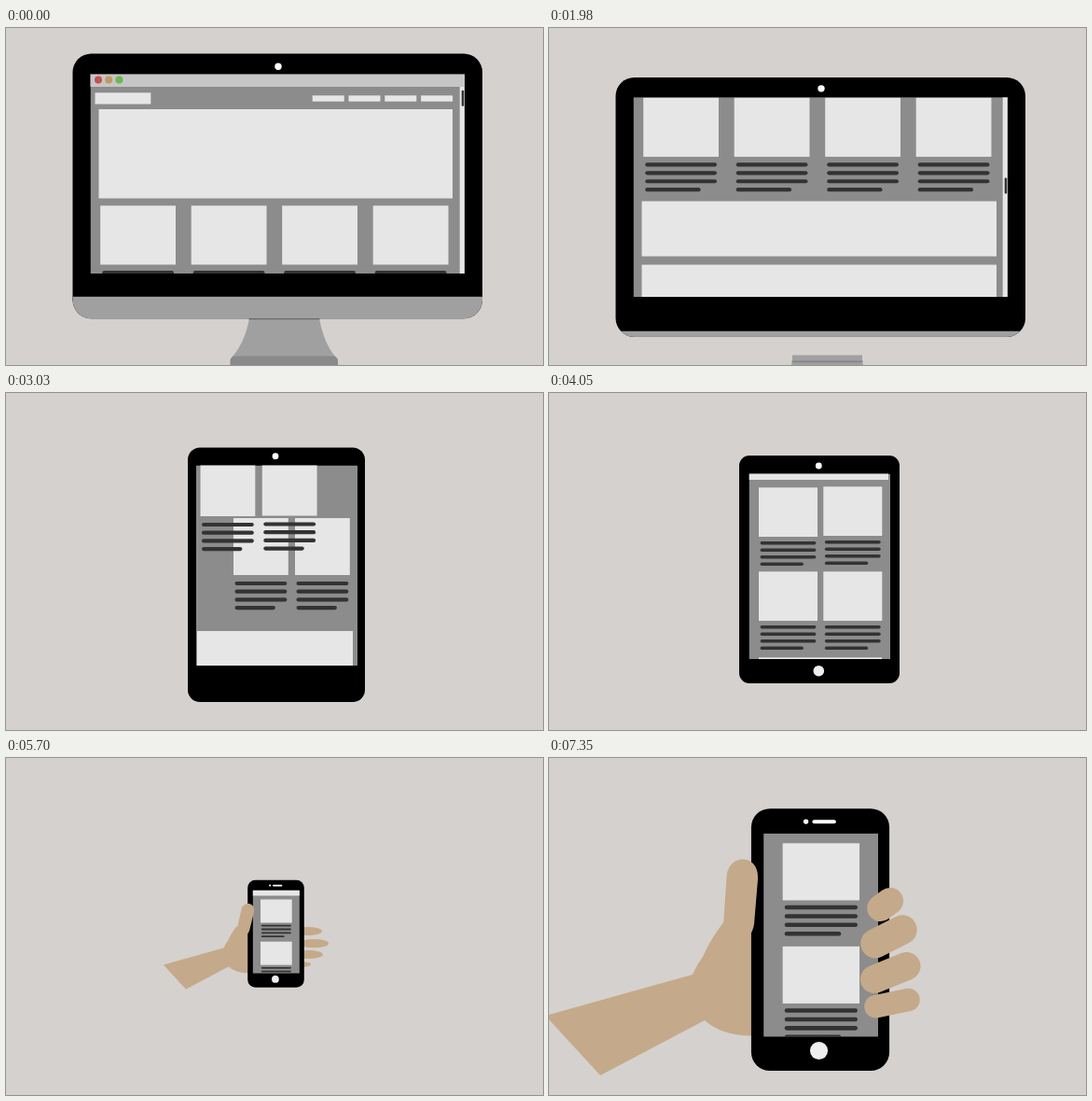
These frames come from a looping animation (576x361 px, 7470 ms). An HTML page:

```html
<!DOCTYPE html>
<html lang="en">
<head>
<meta charset="utf-8">
<title>Responsive layout</title>
<style>
html, body { margin: 0; width: 100%; height: 100%; overflow: hidden; background: #d5d1ce; }
svg { display: block; width: 100vw; height: 100vh; }
</style>
</head>
<body>
<svg id="stage" viewBox="0 0 576 361">
  <defs>
    <clipPath id="screenClip"><rect id="screenBox"/></clipPath>
    <clipPath id="bodyClip"><rect id="bodyBox"/></clipPath>
    <clipPath id="cursorClip"><rect width="576" height="263"/></clipPath>
  </defs>
  <g id="handBack" fill="#c4aa8a">
    <g id="backFingers"></g>
    <path d="M-4 276L154 232Q158 222 165 213Q172 196 187 176L235 176V298L215 297.5Q185 297 167 281L55 340Z"/>
  </g>
  <g id="device">
    <g id="stand">
      <path d="M261 305H336V311Q341 338 354 353H242Q256 338 261 311Z" fill="#a0a0a0"/>
      <path d="M260.5 311.8H336.5" stroke="#858585" stroke-width="1.6"/>
      <rect x="240.5" y="351.5" width="115.5" height="20" rx="5" fill="#8a8a8a"/>
    </g>
    <rect id="body"/>
    <g clip-path="url(#bodyClip)"><rect id="chin" fill="#a0a0a0"/></g>
    <g clip-path="url(#screenClip)">
      <rect id="screen" fill="#8c8c8c"/>
      <g id="page" fill="#e6e6e6"></g>
      <rect id="track" fill="#e6e6e6"/>
    </g>
    <rect id="thumbBar" fill="#333" rx="1"/>
    <circle id="cam" fill="#fff"/>
    <rect id="speaker" x="286" y="135.7" width="10.4" height="1.7" rx=".85" fill="#fff"/>
    <circle id="home" fill="#eee"/>
  </g>
  <g id="handFront" fill="#c4aa8a" stroke-linecap="round">
    <path id="thumb" d="M187 180L190.5 127C192 102 226 102 224 130L220 178Q219 185 215 190Q200 205 187 180Z"/>
    <g id="frontFingers" stroke="#c4aa8a"></g>
  </g>
  <g clip-path="url(#cursorClip)">
    <path id="cursor" d="M0 0V14.5L3.3 11.5L5.6 17L8 16L5.7 10.7H10Z" fill="#000" stroke="#ddd" stroke-width=".6"/>
  </g>
</svg>
<script>
const LOOP = 7470, STEP = 30, PAGE = 140, ZOOM = 2.445;
const $ = id => document.getElementById(id);
const set = (el, o) => { for (const k in o) el.setAttribute(k, o[k]); return el; };
const add = (parent, tag, o) =>
  parent.appendChild(set(document.createElementNS('http://www.w3.org/2000/svg', tag), o || {}));
const box = (el, l, t, r, b) =>
  set(el, { x: l, y: t, width: Math.max(0, r - l), height: Math.max(0, b - t) });

const prog = (t, a, b) => Math.min(1, Math.max(0, (t - a) / (b - a)));
const lin = p => p;
const inOut = p => (1 - Math.cos(Math.PI * p)) / 2;
const easeIn = p => p * p;
const soft = p => p * (1.25 - 0.25 * p);
const easeOut = p => 1 - (1 - p) ** 3;
const lerp = (a, b, p) => a + (b - a) * p;
const mix = (A, B, p) => {
  const o = {};
  for (const k in A) o[k] = A[k].map((v, i) => lerp(v, B[k][i], p));
  return o;
};
const row = (x, y, step) => [x, y, x + step, y, x + 2 * step, y, x + 3 * step, y];

// body: l t r b radius chin | card: w h | block: l y r | line: offset step weight | bar: x w y
const desk = {
  body: [71.5, 27.5, 511, 311.3, 20, 23.5], screen: [90.5, 49.5, 492, 263],
  hero: [99.5, -53, 479, 42.5], cards: row(101.2, 50.3, 97.5), card: [80.8, 63.2],
  block: [99.5, 161.3, 480], line: [8.5, 8.9, 4.2], cam: [292, 41.3, 3.7],
  bar: [486.7, 5, 134], stand: [0]
};
const slid = {
  ...desk, body: [71.5, 62, 511, 338, 20, 0], screen: [90.5, 83, 492, 297],
  hero: [99.5, -20, 479, 76], cards: row(101.2, 83.5, 97.5),
  block: [99.5, 194.3, 480], cam: [292, 73.3, 3.7], bar: [486.7, 5, 170], stand: [62]
};
const narrow = {
  body: [104.5, 62, 477.5, 338, 17, 0], screen: [120.5, 83, 461.5, 297],
  hero: [125, -20, 452.5, 75], cards: row(127, 83, 83.9), card: [69.5, 63.3],
  block: [125, 194, 452.5], line: [8.8, 8.9, 4.2], cam: [291, 73.3, 3.6],
  bar: [458.6, 2.4, 187], stand: [62]
};
const slim = {
  body: [195, 58.5, 385, 331, 13, 0], screen: [204, 77.5, 377, 292],
  hero: [206, -20, 372, 63], cards: [208.5, 71, 274.8, 70.5, 244, 134, 310, 134], card: [58.8, 61],
  block: [205, 255, 372], line: [9, 8.7, 4.2], cam: [289, 67.7, 3.4],
  bar: [377, 0, 187], stand: [62]
};
const tablet = {
  body: [204, 67, 376, 311, 11, 0], screen: [214.5, 86.5, 366, 285],
  hero: [214.5, 50, 364, 93], cards: [225, 101.3, 294.3, 100.3, 225, 191.3, 294.3, 191.3], card: [63, 52.7],
  block: [225, 283.3, 357], line: [6.7, 7.5, 3.6], cam: [289.3, 78, 3.4],
  bar: [366, 0, 187], stand: [62]
};
const phone = {
  body: [259.2, 130.8, 319.8, 245.7, 8.2, 0], screen: [264.6, 141.7, 314.9, 230.8],
  hero: [264.6, 120, 314.9, 147.5],
  cards: [0, 1, 2, 3].flatMap(i => [273, 151.5 + 45.2 * i]), card: [33.7, 25],
  block: [273, 332, 306.7], line: [3.1, 3.85, 1.85], cam: [283.2, 136.5, 1.1],
  bar: [315, 0, 187], stand: [62]
};
const moves = [
  [1770, 2090, slid, inOut], [2150, 2550, narrow, easeIn], [2550, 3030, slim, soft],
  [3030, 3420, tablet, inOut], [4200, 4860, phone, inOut]
];
function poseAt(t) {
  let from = desk;
  for (const [a, b, to, ease] of moves) {
    if (t < a) return from;
    if (t < b) return mix(from, to, ease(prog(t, a, b)));
    from = to;
  }
  return from;
}

// page parts
const page = $('page');
const head = add(page, 'g', { transform: `translate(0 ${-PAGE})` });
box(add(head, 'rect', { fill: '#c6c6c6' }), 90, 49, 493, 63);
['#c4524e', '#bf9a62', '#6fb552'].forEach((fill, i) =>
  add(head, 'circle', { cx: 99 + 11.2 * i, cy: 55.5, r: 4, fill }));
box(add(head, 'rect'), 95.5, 69.3, 155.3, 81.5);
for (let i = 0; i < 4; i++) box(add(head, 'rect'), 328.7 + 38.8 * i, 72.3, 362.7 + 38.8 * i, 78.7);
const hero = add(page, 'rect');
const blocks = [add(page, 'rect'), add(page, 'rect')];
const cards = [0, 1, 2, 3].map(() => add(page, 'rect'));
const lines = cards.map(() => [0, 1, 2, 3].map(() =>
  add(page, 'path', { stroke: '#333', 'stroke-linecap': 'round' })));

// fingers: tip x, y, half thickness
const backF = [[412, 188, 11], [429, 220, 11.5], [414, 249, 11], [383, 275, 8.5]];
backF.forEach(([x, y, r]) => add($('backFingers'), 'ellipse', { cx: x - 38, cy: y, rx: 38, ry: r }));
// inner end, outer end, weight
const frontF = [
  [355.5, 160.8, 365.8, 153.2, 28.5], [350, 198.7, 379, 184, 31.5],
  [349, 237, 383.5, 223, 30], [350.5, 266.3, 385.5, 259, 24.5]
].map(f => [f, add($('frontFingers'), 'path')]);

function drawDevice(p, dy) {
  const [l, t, r, b, rad, chin] = p.body, [sl, st, sr, sb] = p.screen;
  for (const id of ['body', 'bodyBox']) set(box($(id), l, t, r, b), { rx: rad });
  box($('chin'), l, b - chin, r, b);
  box($('screen'), sl, st, sr, sb);
  box($('screenBox'), sl, st, sr, sb);
  set($('stand'), { transform: `translate(0 ${p.stand[0]})` });
  set(page, { transform: `translate(0 ${dy})` });
  set(head, { visibility: p === desk ? 'visible' : 'hidden' });
  box(hero, ...p.hero);

  const [bl, by, br] = p.block;
  blocks.forEach((el, i) => box(el, bl, by + 68 * i, br, by + 68 * i + 59));

  const [w, h] = p.card, [off, gap, weight] = p.line;
  cards.forEach((el, i) => {
    const x = p.cards[2 * i], y = p.cards[2 * i + 1];
    box(el, x, y, x + w, y + h);
    lines[i].forEach((ln, j) => {
      const a = x + w * 0.025 + weight / 2, len = w * 0.95 - weight;
      set(ln, {
        d: `M${a} ${y + h + off + gap * j}h${len * (j < 3 ? 1 : 0.76)}`,
        'stroke-width': weight
      });
    });
  });

  const [bx, bw, barY] = p.bar, ty = barY - 0.48 * dy;
  box($('track'), bx, st + Math.max(0, 13.5 - PAGE + dy), bx + bw, sb);
  box($('thumbBar'), bx + 2, ty, bx + 2 + bw / 2, ty + 17);
  set($('cam'), { cx: p.cam[0], cy: p.cam[1], r: p.cam[2] });
}

function drawHand(t, cx, cy, k) {
  const come = easeOut(prog(t, 4860, 5520));
  const curl = inOut(prog(t, 5700, 5900)), grip = inOut(prog(t, 5880, 6120));
  const tf = `translate(${cx - 24 * (1 - come)} ${cy + 108 * (1 - come)}) scale(${k / ZOOM}) translate(-291 -194.5)`;
  for (const id of ['handBack', 'handFront'])
    set($(id), { transform: tf, visibility: t > 4860 ? 'visible' : 'hidden', opacity: prog(t, 4860, 4980) });
  set($('backFingers'), { transform: `translate(${-90 * curl} 0)` });
  set($('backFingers'), { visibility: t > 4860 && curl < 1 ? 'visible' : 'hidden' });

  const up = inOut(prog(t, 6360, 6540)), down = inOut(prog(t, 6540, 6900));
  const ang = 9 + 4 * up - 13 * down;
  set($('thumb'), { transform: `translate(0 ${5 * (1 - down)}) rotate(${ang} 200 190)` });

  for (const [[x1, y1, x2, y2, w], el] of frontF)
    set(el, {
      d: `M${x2} ${y2}L${lerp(x2, x1, grip)} ${lerp(y2, y1, grip)}`,
      'stroke-width': w * Math.min(1, grip * 2),
      visibility: t > 4860 && grip > 0 ? 'visible' : 'hidden'
    });
}

function draw(t) {
  const p = poseAt(t);
  const dy = PAGE * (1 - inOut(prog(t, 1185, 1790))) - 50.7 * easeOut(prog(t, 6420, 7380));
  drawDevice(p, dy);

  const big = inOut(prog(t, 5700, 6330));
  const k = lerp(1, ZOOM, big), cx = lerp(289.5, 291, big), cy = lerp(188.2, 194.5, big);
  set($('device'), { transform: `translate(${cx} ${cy}) scale(${k}) translate(-289.5 -188.2)` });

  const q = inOut(prog(t, 4200, 4860));
  set($('home'), {
    cx: lerp(289.3, 288.9, q), cy: lerp(297.7, 236.9, q), r: lerp(5.8, 3.9, q),
    opacity: prog(t, 3270, 3420)
  });
  set($('speaker'), { opacity: prog(t, 4680, 4860) });
  drawHand(t, cx, cy, k);

  const go = lin(prog(t, 345, 1182));
  const x = lerp(303, 489.3, go);
  const y = go < 1 ? lerp(263, 67, go) : 67 + 0.48 * (PAGE - dy);
  set($('cursor'), {
    transform: `translate(${x} ${y})`,
    visibility: t >= 360 && t < 1830 ? 'visible' : 'hidden'
  });
}

const start = performance.now();
function tick(now) {
  const t = Math.max(0, now - start) % LOOP;
  draw(Math.floor(t / STEP) * STEP);
  requestAnimationFrame(tick);
}
draw(0);
requestAnimationFrame(tick);
</script>
</body>
</html>
```
